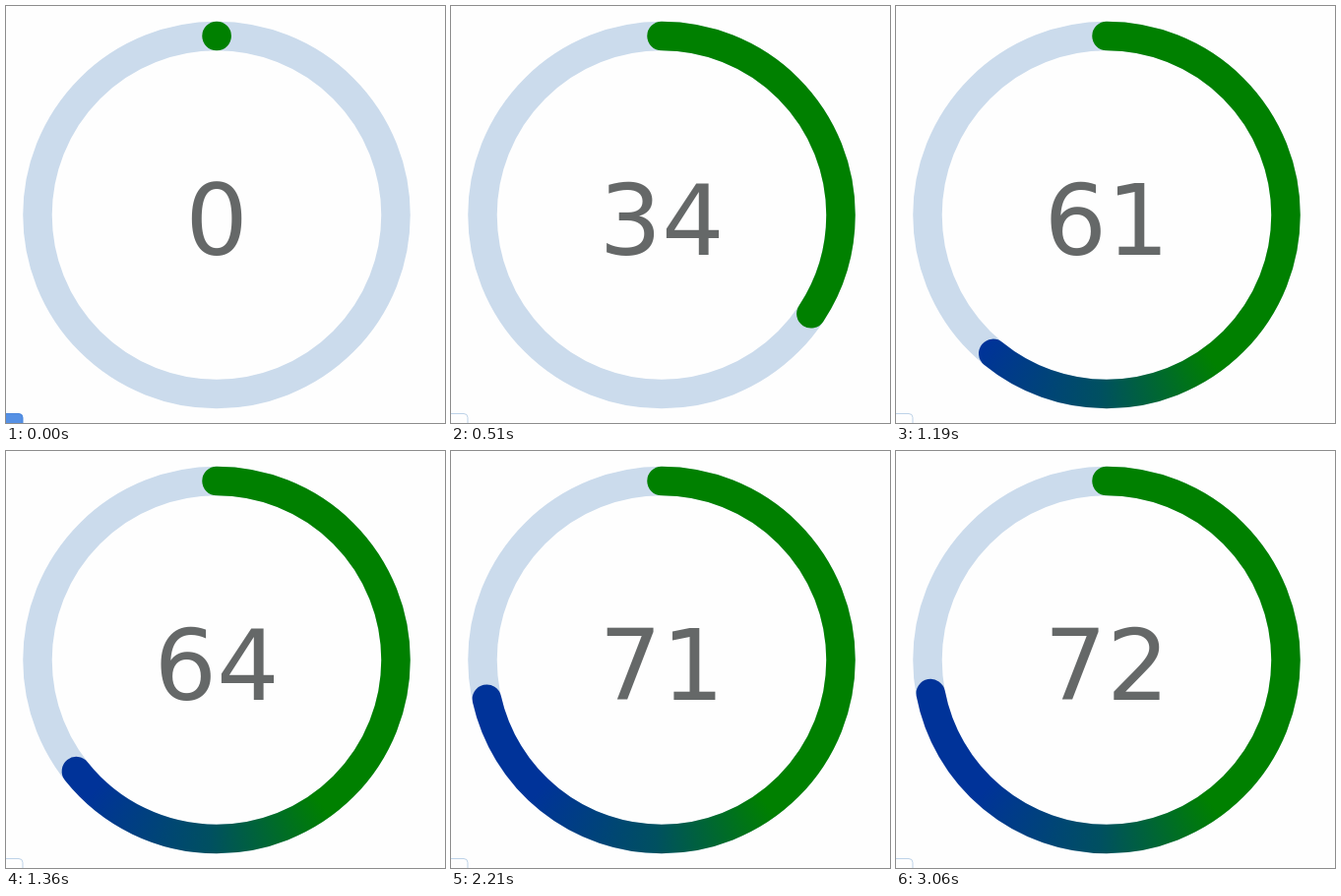
These frames come from a looping animation (446x424 px, 3570 ms). An HTML page with a canvas:

```html
<!DOCTYPE html>
<html lang="en">
<head>
<meta charset="utf-8">
<title>Circular progress</title>
<style>
  html, body { margin: 0; width: 100%; height: 100%; overflow: hidden; background: #fefefe; }
  svg, canvas { position: absolute; left: 0; top: 0; width: 446px; height: 424px; }
  text { font: 100px "DejaVu Sans", Verdana, sans-serif; fill: #656868; text-anchor: middle; }
  .track { fill: none; stroke: #cbdbec; stroke-width: 29.5; }
  .button { fill: #fefefe; stroke: #bdd2e8; }
  .button.pressed { fill: #5590e4; stroke: #4a86dc; }
</style>
</head>
<body>
<svg viewBox="0 0 446 424">
  <circle class="track" cx="214" cy="212.5" r="182"/>
  <rect class="button" id="button" x="-20" y="414.5" width="37" height="30" rx="4"/>
  <text id="label" x="214" y="253">0</text>
</svg>
<canvas id="ring" width="446" height="424"></canvas>
<script>
const LOOP = 3570, STEP = 170, LAST = 18, GOAL = 72;
const CX = 214, CY = 212.5, RADIUS = 182, TOP = -Math.PI / 2;

// [time, eased progress]; between points the cube root of the remainder is linear
const CURVE = [[0, 0], [340, 0.329], [850, 0.703], [1190, 0.846],
               [1700, 0.957], [2210, 0.993], [2720, 1], [LOOP, 1]];

const label = document.getElementById('label');
const button = document.getElementById('button');
const ctx = document.getElementById('ring').getContext('2d');

const paint = ctx.createConicGradient(TOP, CX, CY);
[[0, '#008000'], [0.4, '#008000'], [0.505, '#005060'],
 [0.62, '#003399'], [0.85, '#003399'], [0.851, '#008000'], [1, '#008000']]
  .forEach(([at, color]) => paint.addColorStop(at, color));
ctx.strokeStyle = paint;
ctx.lineWidth = 29.5;
ctx.lineCap = 'round';

function progress(time) {
  const i = CURVE.findIndex(([t]) => t > time);
  const [t0, p0] = CURVE[i - 1], [t1, p1] = CURVE[i];
  const r0 = Math.cbrt(1 - p0), r1 = Math.cbrt(1 - p1);
  return 1 - (r0 + (r1 - r0) * (time - t0) / (t1 - t0)) ** 3;
}

function draw(step) {
  const percent = GOAL * progress(step * STEP);
  label.textContent = Math.round(percent);
  button.classList.toggle('pressed', step === 0);
  ctx.clearRect(0, 0, 446, 424);
  ctx.beginPath();
  ctx.arc(CX, CY, RADIUS, TOP, TOP + Math.max(0.001, percent / 100 * 2 * Math.PI));
  ctx.stroke();
}

const start = performance.now();
let shown = -1;
function tick() {
  const time = (performance.now() - start) % LOOP;
  const step = Math.min(LAST, Math.floor(time / STEP));
  if (step !== shown) draw(shown = step);
  requestAnimationFrame(tick);
}
tick();
</script>
</body>
</html>
```
